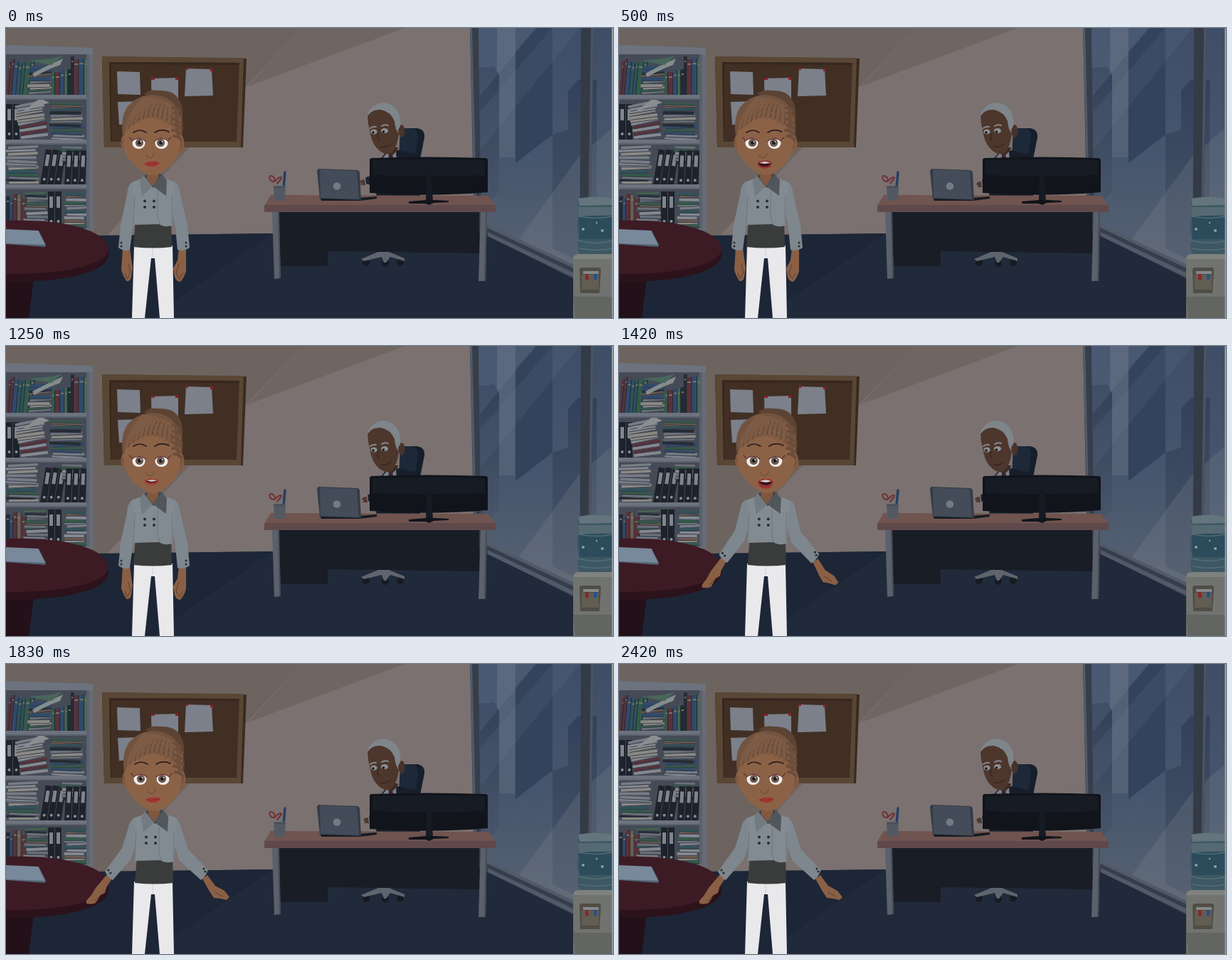
Write an HTML page that moves like this. It is 853x408 px and loops after 2510 ms.

```html
<!DOCTYPE html>
<html lang="en">
<head>
<meta charset="utf-8">
<title>Office talk</title>
<style>
html, body { margin: 0; width: 100%; height: 100%; overflow: hidden; background: #1f2938; }
svg { display: block; width: 100vw; height: 100vh; }
.ln { fill: none; stroke-linecap: round; stroke-linejoin: round; }
</style>
</head>
<body>
<svg viewBox="0 0 853 408" preserveAspectRatio="none">
<defs>
  <linearGradient id="glass" x1="0" y1="0" x2="0" y2="1">
    <stop offset="0" stop-color="#3e4e67"/><stop offset=".5" stop-color="#46566e"/><stop offset="1" stop-color="#5c6472"/>
  </linearGradient>
  <linearGradient id="tower" x1="0" y1="0" x2="0" y2="1">
    <stop offset="0" stop-color="#32415a"/><stop offset="1" stop-color="#4a566a"/>
  </linearGradient>
  <clipPath id="pane"><path d="M664 0H851V362L668 274Z"/></clipPath>
  <clipPath id="rack"><path d="M0 36H113V282H0Z"/></clipPath>
</defs>

<!-- walls and floor -->
<path fill="#7a7170" d="M0 0H853V300H0Z"/>
<path fill="#6d645f" d="M0 0H416L340 80L141 293H0Z"/>
<path fill="#6f6662" d="M416 0H560L340 82Z"/>
<path fill="#202a3a" d="M0 294L375 289L677 283L853 370V408H0Z"/>
<path fill="#1c2637" d="M120 292L375 289L240 382L210 408H0V330Z"/>

<!-- window -->
<g clip-path="url(#pane)">
  <path fill="url(#glass)" d="M660 0H853V370H660Z"/>
  <path fill="#536176" d="M690 0H716L715 182H690Z"/>
  <path fill="url(#tower)" d="M664 56L686 54L693 66V230L664 260Z"/>
  <path fill="#34435c" d="M745 0H768V150L716 190V32Z"/>
  <path fill="url(#tower)" d="M768 150L790 143V88L804 73H830V340L768 310Z"/>
  <path fill="#8292a5" fill-opacity=".16" d="M664 0H745L664 98Z"/>
  <path fill="#8292a5" fill-opacity=".1" d="M768 0H806L664 175V120Z"/>
  <path fill="#8a8f98" fill-opacity=".2" d="M806 180L720 298L853 365V140Z"/>
</g>
<path fill="#363e4b" d="M652 0H664L668 274L853 362V381L677 292L658 284Z"/>
<path fill="#515a68" d="M652 0H655L662 284H659ZM668 272L853 359V364L668 277ZM677 287L853 371V378L677 293Z"/>
<path fill="#343b47" d="M808 0H826L820 346L806 339Z"/>
<path fill="#4b5361" d="M822 0H826L820 346L817 345Z"/>

<!-- notice board -->
<path fill="#3a2a20" d="M135 40L338 43L333 168H138Z"/>
<path fill="#594635" d="M135 40L334 42L330 168H138Z"/>
<path fill="#412f24" d="M145 48L328 49L324 160H147Z"/>
<path fill="#36271d" d="M145 48L328 49V52L148 51V160H147Z"/>
<path fill="#7b808b" d="M156 61L188 62L189 94L157 93ZM204 71L242 70L242 118L205 120ZM253 57L289 58L291 95L251 96ZM157 104L188 103L190 135L159 136Z"/>
<path fill="#85202b" d="M204 70h5v3h-5zM238 69h4v4h-4zM252 56h4v3h-4zM287 57h4v4h-4z"/>

<!-- bookcase -->
<path fill="#656c78" d="M0 24L122 28L123 285H0Z"/>
<path fill="#444b56" d="M0 36H113V282H0Z"/>
<g id="books" clip-path="url(#rack)"></g>
<path fill="#6c737f" d="M0 94H114V101H0ZM0 157H114V164H0ZM0 220H114V227H0ZM0 24L122 28V37H0Z"/>
<path fill="#5a616c" d="M113 37H117V282H113ZM0 99H113V101H0ZM0 162H113V164H0ZM0 225H113V227H0Z"/>

<!-- round table -->
<path fill="#231019" d="M0 345H40L32 408H0Z"/>
<path fill="#2c121b" d="M0 275Q142 275 144 312V320C140 347 70 358 0 357Z"/>
<path fill="#3d1b24" d="M0 271C80 268 142 284 144 311C142 336 70 347 0 346Z"/>
<path fill="#526477" d="M0 304L55 308L56 305L46 285H0Z"/>
<path fill="#78899b" d="M0 283L45 285L55 305L0 303Z"/>

<!-- chair and seated colleague -->
<path fill="#151e2b" d="M554 141H578Q589 143 588 154L582 184H556Z"/>
<path fill="#1d2939" d="M554 141H572Q580 144 579 155L574 184H552Z"/>
<path fill="#171e2a" d="M525 186L533 176L552 172L574 177L582 190V237H520Z"/>
<path fill="#3c2a23" d="M531 168H551L547 181H535Z"/>
<path fill="#7c8089" d="M530 182L535 176L541 181L548 174L549 186H530Z"/>
<path fill="#422330" d="M538 179L543 178L545 187H537Z"/>
<ellipse cx="556" cy="145" rx="4.500" ry="9" fill="#48332a"/>
<path fill="#7e858b" d="M508 134C504 118 516 106 530 105C545 106 557 118 554 138L549 146L540 122Z"/>
<path fill="#4d362c" d="M508 124Q508 134 511 143Q513 160 521 169Q530 179 540 177Q549 171 552 149Q547 143 546 131Q541 118 527 115Q514 114 508 124Z"/>
<g class="ln" stroke="#858a90" stroke-width="2"><path d="M512 141Q515 138 520 139"/><path d="M528 138Q532 135 537 137"/></g>
<ellipse cx="517" cy="146" rx="4.600" ry="3.600" fill="#8c8f92"/><ellipse cx="532" cy="144.500" rx="5" ry="3.600" fill="#8c8f92"/>
<circle cx="516" cy="147" r="1.800" fill="#16171a"/><circle cx="530.500" cy="146" r="1.800" fill="#16171a"/>
<g class="ln" stroke="#2d1d19"><path d="M523 148Q520 157 525 158"/><path d="M527 167Q535 169 541 163"/></g>

<!-- desk -->
<path fill="#191d26" d="M383 258H665V317L452 314V335H386Z"/>
<path fill="#5b616b" d="M374 258H383L386 352L377 353ZM667 258H676L674 356H664Z"/>
<path fill="#474d57" d="M382 258H384L386 352H384ZM674 258H676L674 356H672Z"/>
<g fill="#171a21"><circle cx="506" cy="330" r="5"/><circle cx="533" cy="331" r="5"/><circle cx="554" cy="330" r="5"/></g>
<path fill="#5f656e" d="M523 315H538L560 324V328L540 322L534 330H531L528 322L503 328L499 325Z"/>
<path fill="#70544f" d="M372 235L678 236L688 250H363Z"/>
<path fill="#60494a" d="M363 249H688V259H363Z"/>
<g id="typist">
  <path fill="#1a2331" d="M504 211L514 207V221L505 219Z"/>
  <path fill="#7c8089" d="M503 211L505 210L506 219L504 219Z"/>
  <path fill="#50382d" d="M504 213Q498 213 497 217L500 219L498 221L505 221Z"/>
</g>
<path fill="#161a22" d="M442 240L496 239L521 237V240L497 243H443Z"/>
<path fill="#333b46" d="M439 198L494 200Q497 201 497 204L499 242L441 240L437 201Z"/>
<path fill="#434c58" d="M441 199L493 201L496 241L442 239Z"/>
<circle cx="465" cy="222.500" r="5.300" fill="#737b85"/>
<path fill="#11141b" d="M513 183Q595 180 675 183L677 185V231Q594 238 511 232V185Z"/>
<path fill="#171b24" d="M515 186Q595 183 673 186V207Q594 210 515 207Z"/>
<path fill="#161a22" d="M591 199H597L600 244H590Z"/>
<path fill="#11141a" d="M566 244L590 242H602L622 243V245L601 246L595 249L589 247L566 247Z"/>
<g class="ln" stroke-width="2">
  <path stroke="#263f63" stroke-width="3.500" d="M392 203L390 225"/><path stroke="#66717e" d="M384 213L389 225"/>
  <ellipse cx="374" cy="212" rx="4.500" ry="3" transform="rotate(50 374 212)" stroke="#712f34"/>
  <path stroke="#712f34" d="M377 216L383 211Q389 208 386 213L381 219"/>
</g>
<path fill="#535962" d="M376 222H393L392 243H377Z"/>
<path class="ln" stroke="#3d434c" d="M377 224H392"/>

<!-- water cooler -->
<path fill="#3d5863" d="M804 240Q828 236 853 240V319H806Q801 308 805 296Q801 280 804 267Z"/>
<path fill="#64757d" d="M804 240Q828 235 853 240V249L806 250Z"/>
<path fill="#566a73" d="M804 252H853V263L805 265Z"/>
<path fill="#2c4c5c" d="M805 266Q830 262 853 266V297H806Z"/>
<path class="ln" stroke="#5c7882" d="M805 265Q830 270 853 265M804 299Q830 306 853 299M806 310Q830 315 853 310"/>
<g fill="#8ba0a7"><circle cx="811" cy="283" r="2"/><circle cx="838" cy="285" r="2"/><circle cx="830" cy="274" r="1.200"/></g>
<path fill="#717370" d="M797 324Q798 318 806 318H853V408H797Z"/>
<path fill="#7f817e" d="M797 324Q798 318 806 318H853V325H797Z"/>
<path fill="#636561" d="M797 378H853V408H800Z"/>
<path fill="#504d45" d="M806 340Q806 337 810 337H833Q836 337 836 341L834 373H807Z"/>
<path fill="#615d53" d="M809 347H833V368H809Z"/>
<path fill="#85878a" d="M811 342H833V346H811Z"/>
<path fill="#8a2429" d="M814 346h4l1 8h-5z"/><path fill="#27508a" d="M826 346h5l-1 8h-4z"/>
<path fill="#95a0aa" d="M851.500 0H853V408H851.500Z"/>

<!-- presenter -->
<path fill="#e9e8eb" d="M180 306H234L236 408H216L209 324H204L195 408H177Z"/>
<path class="ln" stroke="#cfced2" d="M206 310V323"/>
<g id="torso">
  <path fill="#393c3b" d="M182 270H232L233 308Q207 311 179 308Z"/>
  <g class="down" data-turn="26" data-pivot="172 258">
    <path fill="#8a6045" d="M164 309H174Q176 326 178 337L176 350Q175 357 169 356Q164 348 162 341Z"/>
    <path class="ln" stroke="#5d3c2d" d="M172 332L175 344L171 352M167 345L170 353"/>
    <path fill="#7e878e" d="M177 217Q171 221 170 235L161 277L158 309Q166 315 174 312L178 282L186 234Z"/>
  </g>
  <g class="down" data-turn="-38" data-pivot="246 258">
    <path fill="#8a6045" d="M243 309H253L253 342Q250 352 245 357Q239 357 237 350L235 338L241 327Z"/>
    <path class="ln" stroke="#5d3c2d" d="M243 332L239 345L243 352M248 345L244 353"/>
    <path fill="#7e878e" d="M237 217Q244 221 245 235L255 277L258 309Q250 315 241 312L238 282L231 234Z"/>
  </g>
  <g class="out" data-turn="26" data-pivot="169 258">
    <path fill="#8a6045" d="M140 296L147 302L139 314L137 322L131 325L124 336Q119 339 111 337L111 333L118 325L124 315Z"/>
    <path class="ln" stroke="#5d3c2d" d="M131 325L122 334"/>
    <path fill="#7e878e" d="M179 217Q172 219 170 230L161 259L137 292Q142 301 148 304L174 274L187 235Z"/>
    <g fill="#292d33"><circle cx="142" cy="290" r="1.600"/><circle cx="145" cy="294" r="1.600"/></g>
  </g>
  <g class="out" data-turn="-38" data-pivot="245 258">
    <path fill="#8a6045" d="M274 302L281 297L292 312L305 319L312 328L308 332L299 330L290 329L284 320Z"/>
    <path class="ln" stroke="#5d3c2d" d="M292 321L302 327"/>
    <path fill="#7e878e" d="M234 217Q242 219 244 230L254 261L282 290Q278 300 272 304L241 276L229 235Z"/>
    <g fill="#292d33"><circle cx="276" cy="288" r="1.600"/><circle cx="278" cy="292" r="1.600"/></g>
  </g>
  <path fill="#828b92" d="M177 217L193 211H222L238 217L236 245L234 278Q222 281 215 276L178 277L181 245Z"/>
  <path class="ln" stroke="#6c757c" d="M181 236L179 276M234 236L233 275M213 230L213 265L216 276"/>
  <path fill="#414648" d="M194 208L199 205H216L221 207L213 222L207 225Z"/>
  <path fill="#80573f" d="M198 199H215L214 211L207 223L198 212Z"/>
  <path fill="#727b81" d="M193 207L188 216L191 237L206 223Z"/>
  <path fill="#50565a" d="M219 206L226 214L225 236L211 226L207 221Z"/>
  <g id="buttons" fill="#292d33"></g>
  <g class="down" fill="#292d33"><circle cx="162" cy="302" r="1.500"/><circle cx="162" cy="307" r="1.500"/><circle cx="253" cy="302" r="1.500"/><circle cx="253" cy="307" r="1.500"/></g>
</g>
<g id="head">
  <path fill="#5c4334" d="M194 93Q202 86 214 88Q234 87 241 98Q250 108 248 128Q250 143 247 156L235 160L225 105Z"/>
  <ellipse cx="166" cy="161" rx="4.500" ry="10" fill="#845b42"/>
  <ellipse cx="245" cy="163" rx="5.500" ry="13" fill="#845b42"/>
  <path class="ln" stroke="#6b4734" d="M245 156Q249 162 244 169M165 156Q162 160 166 166"/>
  <path fill="#8c6247" d="M166 128C163 148 164 164 168 176Q178 195 198 205Q207 209 216 205Q236 193 242 178Q247 160 246 128Q208 94 166 128Z"/>
  <path fill="#715340" d="M164 152Q160 124 172 109Q186 94 207 94Q230 96 239 111Q247 127 244 155L240 154Q239 137 231 130L215 125L196 125L178 130Q168 137 166 152Z"/>
  <g id="braids" class="ln"></g>
  <g id="brows" class="ln" stroke="#2a1d1b" stroke-width="1.700"><path d="M179 147Q188 141 197 147"/><path d="M209 147Q218 141 229 146"/></g>
  <g id="eyes"></g>
  <path class="ln" stroke="#6b4531" d="M197 178Q197 181 200 182Q204 184 207 180L208 176"/>
  <g class="mouth">
    <path fill="#a43535" d="M194 191Q200 187 205 188Q210 186 216 190Q211 196 204 195Q198 195 194 191Z"/>
    <path class="ln" stroke="#8a2e30" d="M196 191Q206 192 214 190"/>
  </g>
  <g class="mouth">
    <path fill="#a43b3a" d="M194 190Q200 186 205 187Q210 186 215 189Q213 195 205 196Q197 195 194 190Z"/>
    <path fill="#41151b" d="M196 190Q205 187 213 190Q205 195 196 190Z"/><path fill="#d5cfcb" d="M198 189.500Q205 187 212 189.500L205 191Z"/>
  </g>
  <g class="mouth">
    <path fill="#963335" d="M194 190Q200 185 205 187Q210 185 215 189Q215 197 205 198Q195 197 194 190Z"/>
    <path fill="#39141a" d="M196 190Q205 186 213 190Q212 195 205 195Q197 195 196 190Z"/><path fill="#d5cfcb" d="M197 190Q205 186 213 190L205 191Z"/>
  </g>
  <g class="mouth">
    <path fill="#9b3435" d="M193 191Q199 185 205 187Q210 185 215 190Q215 200 205 201Q194 200 193 191Z"/>
    <path fill="#35131a" d="M195 191Q205 186 213 191Q213 195 205 196Q196 195 195 191Z"/><path fill="#d5cfcb" d="M196 190.500Q205 186 212 190.500L205 192Z"/>
  </g>
</g>
</svg>
<script>
const $ = s => document.querySelector(s), all = s => [...document.querySelectorAll(s)];
let seed = 11;
const rnd = (a = 0, b = 1) => a + (b - a) * ((seed = seed * 16807 % 2147483647) / 2147483647);
const pick = list => list[Math.floor(rnd(0, list.length))];
const box = (x, y, w, h, fill, tilt = 0) =>
  `<rect x="${x}" y="${y}" width="${w}" height="${h}" fill="${fill}" transform="rotate(${tilt} ${x} ${y + h})"/>`;

const covers = ['#335a48', '#45664f', '#57323b', '#304a6b', '#30525a', '#6e5b50', '#242b34'];
const pages = ['#858890', '#777c85', '#8b8985', '#6b7078'];

function upright(x, end, base, tall, tilt = 0) {
  let out = '';
  while (x < end) {
    const w = rnd(4, 8), h = rnd(tall - 9, tall), c = pick(covers);
    out += `<g transform="rotate(${tilt} ${x} ${base})">` + box(x, base - h, w, h, c) +
      box(x + 1, base - h + 6, w - 2, 2, '#77766b') + box(x + w - 1, base - h, 1, h, '#1e2830') + '</g>';
    x += w;
  }
  return out;
}
function pile(x, base, w, tall, tilt = 0) {
  let out = '';
  for (let y = 0; y < tall;) {
    const h = rnd(2.5, 5), dx = rnd(-3, 3), lean = rnd(-3, 3);
    out += box(x + dx, base - y - h, w, h, pick(rnd() < .6 ? pages : covers), lean) +
      box(x + dx, base - y - .8, w, .8, '#303743', lean);
    y += h;
  }
  return `<g transform="rotate(${tilt} ${x} ${base})">${out}</g>`;
}
function binders(x, n, base, tilt = 0) {
  let out = '';
  for (let i = 0; i < n; i++) {
    const bx = x + i * 10;
    out += box(bx, base - 50, 9, 50, '#1d222b', tilt) + `<g transform="rotate(${tilt} ${bx} ${base})">` +
      box(bx + 2, base - 43, 5, 16, '#80858d') + `<circle cx="${bx + 4.5}" cy="${base - 8}" r="2" fill="#8a8e94"/></g>`;
  }
  return out;
}
$('#books').innerHTML =
  upright(0, 36, 94, 52, 5) + pile(32, 94, 31, 36, -3) +
  '<path fill="#858c8c" d="M37 64Q55 54 80 43L76 52Q58 58 40 69Z"/><path fill="#49665a" d="M31 46L64 52L79 39L64 43Z"/>' +
  upright(64, 90, 94, 40) + upright(91, 113, 94, 54) +
  binders(0, 2, 157) + pile(21, 157, 38, 46, -9) + pile(64, 157, 44, 50) +
  '<path fill="#8b8d91" d="M21 119L48 99L61 105L37 113Z"/>' +
  pile(2, 220, 42, 52) + binders(48, 3, 220, 9) + pile(78, 192, 28, 24) + binders(82, 3, 222, 3) +
  upright(0, 25, 282, 50) + pile(27, 282, 30, 50) + binders(59, 2, 280) + pile(83, 282, 28, 50);

for (const x of [195, 208]) for (const y of [243.5, 252])
  $('#buttons').innerHTML += `<circle cx="${x}" cy="${y}" r="2"/>`;

// Cornrows fan out from the hairline.
let rows = '';
for (let k = 0; k < 11; k++) {
  const u = k / 10, x = 170 + 66 * u, y = 141 - 16 * Math.sin(Math.PI * u);
  const tx = 193 + 41 * u, ty = 99 + 12 * u * u;
  const d = `M${x} ${y}Q${x + 1} ${y - 16} ${tx} ${ty}`;
  rows += `<path d="${d}" stroke="#7d5b44" stroke-width="5"/>` +
    `<path d="${d}" stroke="#5f4434" stroke-width="1.2" stroke-dasharray="5 3" transform="translate(3 0)"/>`;
}
for (let k = 0; k < 6; k++)
  rows += `<path d="M${234 + k % 2 * 2} ${112 + k * 8}q6 0 10 5" stroke="#6b4d3a" stroke-width="4"/>`;
$('#braids').innerHTML = rows;

const eye = (x, side) => `<ellipse cx="${x}" cy="162" rx="9" ry="8" fill="#efedec"/>
  <circle cx="${x + side}" cy="161.5" r="5.6" fill="#6a5a50"/><circle cx="${x + side}" cy="161.5" r="2.4" fill="#1d1817"/>
  <circle cx="${x + side + 2}" cy="160" r="1" fill="#ddd"/>
  <path d="M${x - 10} 159Q${x} 148 ${x + 10} 159Q${x} 153 ${x - 10} 159Z" fill="#835943"/>
  <path d="M${x - 10 * side} 157l${-3 * side} -3M${x - 9.5} 159Q${x} 152 ${x + 9.5} 159" class="ln" stroke="#5f2c33" stroke-width="1.2"/>`;
$('#eyes').innerHTML = eye(186.5, 1) + eye(218.5, -1);

const LOOP = 2510, STEP = 1000 / 12, LAST = 29;
const speech = '012321232121231123231200121210';
const keys = '001122211222110101211222001122';
const taps = [[0, 0], [3, -1], [5, 3]];
const mouths = all('.mouth'), arms = all('.down, .out');
const typist = $('#typist'), head = $('#head'), torso = $('#torso'), brows = $('#brows');
const ramp = (i, from, to) => Math.max(0, Math.min(1, (i - from) / (to - from)));
const shift = (el, x, y = 0) => el.setAttribute('transform', `translate(${x} ${y})`);

function draw(now) {
  const i = Math.min(LAST, Math.floor((now % LOOP + 4) / STEP));
  const lift = 1 - (1 - ramp(i, 15, 18)) ** 2;
  mouths.forEach((m, k) => m.style.display = k == speech[i] ? '' : 'none');
  shift(typist, ...taps[keys[i]]);
  shift(head, 2 * lift);
  shift(torso, 2 * lift);
  shift(brows, 0, -6 * ramp(i, 12, 15));
  for (const a of arms) {
    const open = a.classList.contains('out');
    a.style.display = open == lift > .5 ? '' : 'none';
    if (a.dataset.turn)
      a.setAttribute('transform', `rotate(${a.dataset.turn * (open ? lift - 1 : lift)} ${a.dataset.pivot})`);
  }
}
const start = performance.now();
function tick() {
  draw(performance.now() - start);
  requestAnimationFrame(tick);
}
tick();
</script>
</body>
</html>
```
